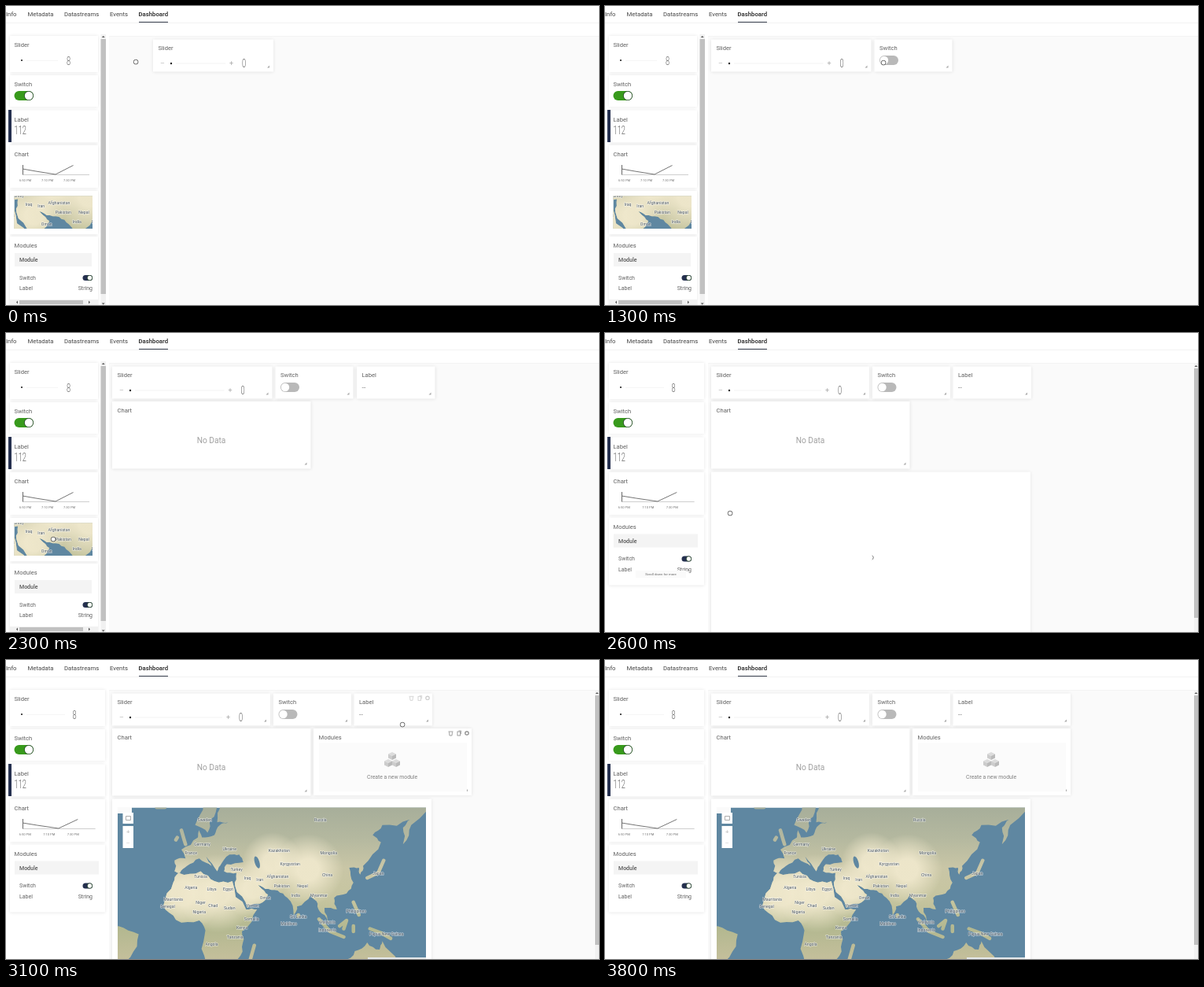
Recreate the animation shown at these times as an HTML page with a canvas. Size 754 by 380 pixels, loop 4.3 s.

```html
<!DOCTYPE html>
<html lang="en">
<head>
<meta charset="utf-8">
<title>Dashboard builder</title>
<style>
html, body { margin: 0; width: 100%; height: 100%; overflow: hidden; background: #fff; }
canvas { display: block; }
</style>
</head>
<body>
<canvas id="stage" width="754" height="380"></canvas>
<script>
const ctx = document.getElementById('stage').getContext('2d');
const LOOP = 4300, NAVY = '#25304f', GREEN = '#389a1c', OCEAN = '#5f87a1';
const clamp = v => Math.max(0, Math.min(1, v));
const mix = (a, b, k) => a + (b - a) * k;

// ---------- drawing helpers ----------
function text(s, x, y, size = 7.6, color = '#606060', weight = 400, align = 'left') {
  ctx.font = `${weight} ${size}px Roboto, sans-serif`;
  ctx.fillStyle = color;
  ctx.textAlign = align;
  ctx.fillText(s, x, y);
}
// Condensed light digits
function readout(s, x, y, align = 'center') {
  ctx.save();
  ctx.translate(x, y);
  ctx.scale(.6, 1);
  text(s, 0, 0, 15.5, '#666', 300, align);
  ctx.restore();
}
function rect(x, y, w, h, color) {
  ctx.fillStyle = color;
  ctx.fillRect(x, y, w, h);
}
function line(points, color, width = 1, closed = false) {
  ctx.beginPath();
  points.forEach(([x, y]) => ctx.lineTo(x, y));
  if (closed) ctx.closePath();
  ctx.strokeStyle = color;
  ctx.lineWidth = width;
  ctx.stroke();
}
function shape(points, color) {
  ctx.beginPath();
  points.forEach(([x, y]) => ctx.lineTo(x, y));
  ctx.fillStyle = color;
  ctx.fill();
}
function dot(x, y, r, color) {
  ctx.beginPath();
  ctx.arc(x, y, r, 0, 7);
  ctx.fillStyle = color;
  ctx.fill();
}
function arrow(x, y, angle) {
  ctx.save();
  ctx.translate(x, y);
  ctx.rotate(angle);
  shape([[-2, 1], [0, -1], [2, 1]], '#555');
  ctx.restore();
}
function card(x, y, w, h, fill = '#fff') {
  ctx.save();
  ctx.shadowColor = 'rgba(0,0,0,.1)';
  ctx.shadowBlur = 4;
  rect(x, y, w, h, fill);
  ctx.restore();
}
function pill(x, y, w, h, on, color) {
  ctx.beginPath();
  ctx.roundRect(x, y, w, h, h / 2);
  ctx.fillStyle = color;
  ctx.fill();
  const knob = on ? x + w - h / 2 : x + h / 2;
  if (on) dot(knob, y + h / 2, h / 2, '#2c4a30');
  dot(knob, y + h / 2, h / 2 - .8, '#fff');
}
function scrollbar(x, y, w, h, thumb) {
  rect(x, y, w, h, '#f1f1f1');
  rect(x, y + 6, w, thumb, '#c1c1c1');
  arrow(x + w / 2, y + 3, 0);
}

// ---------- world map: key coast points as longitude,latitude ----------
const CONTINENTS = [
  '-9,37 -9,43 -1,44 -4,48.5 8,54 9,57 11,54 20,55 24,59 30,60 22,60 24,66 17,61 15,56 6,59 12,66 26,71 42,67 68,69 105,77 180,70 163,59 157,51 157,58 162,61 142,59 135,55 141,52 128,40 126,35 125,39 118,39 121,30 116,23 107,20 109,12 100,13 104,2 98,9 95,16 90,22 80,14 77.5,8 73,20 66,25 57,26 50,30 56,25 59,22 53,16 44,13 35,28 36,36 27,37 29,41 41,42 38,46 31,46 24,40 22,37 14,45 18,40 9,44 0,40 -5,36',
  '-6,36 10,37 20,31 33,31 43,12 51,12 40,-4 40,-15 35,-26 14,-26 13,-6 9,4 -8,4.5 -17,15 -10,30',
  '114,-26 122,-18 131,-12 140,-17 142,-11 153,-26',
  '-50,0 -35,-6 -41,-22 -50,-27'
];
const ISLANDS = '-1,51 -2,53 -4,57|-8,53 -7,54|-22,65 -16,65|46,-24 49,-14|131,33 139,36 143,43|96,5 104,-4 114,-8|111,0 116,4 114,-2|121,0 121,-4|133,-2 141,-5 148,-9|121,17 125,8|81,8 81,7'.split('|');
const COUNTRIES = `Russia 97 61|Kazakhstan 67 48|Mongolia 103 47|Kyrgyzstan 75 41|China 102 35|Ukraine 31 49
France 3 47|Germany 11 51|Sweden 13 61|Turkey 36 38|Iraq 44 33|Iran 53 32|Afghanistan 66 34|Pakistan 69 28
Nepal 84 28|India 79 22|Oman 57 20|Yemen 48 15|Egypt 30 26|Libya 18 26|Algeria 3 27|Tunisia 10 34
Mauritania -10 19|Niger 10 17|Chad 19 15|Sudan 31 13|Senegal -14 14|Nigeria 9 10|Somalia 47 5|Kenya 40 -1
Angola 18 -13|Tanzania 35 -8|Sri Lanka 81 7|Maldives 74 2|Myanmar 96 22|Malaysia 102 3|Philippines 123 11
Indonesia 102 -3|Papua New Guinea 145 -6|Japan 139 36`.split(/[|\n]/)
  .map(s => s.match(/(.+) (\S+) (\S+)/).slice(1));

const project = (lon, lat) =>
  [230 + 1.75 * lon, 338 - 100 * Math.log(Math.tan(Math.PI / 4 + lat * Math.PI / 360))];
const parse = s => s.split(' ').map(p => project(...p.split(',').map(Number)));

let seed = 7;
const random = () => (seed = seed * 16807 % 2147483647) / 2147483647;

// Splits every edge and nudges its middle, for a natural coast.
function roughen(points) {
  return points.flatMap(([x, y], i) => {
    const [u, v] = points[(i + 1) % points.length], k = (random() - .5) * .3;
    return [[x, y], [(x + u) / 2 + (v - y) * k, (y + v) / 2 - (u - x) * k]];
  });
}
const land = new Path2D(), islands = new Path2D();
CONTINENTS.forEach(s => {
  roughen(roughen(parse(s))).forEach(([x, y], i) => i ? land.lineTo(x, y) : land.moveTo(x, y));
  land.closePath();
});
ISLANDS.forEach(s => parse(s).forEach(([x, y], i) => i ? islands.lineTo(x, y) : islands.moveTo(x, y)));

const terrain = ctx.createLinearGradient(0, 187, 0, 380);
['#a7ae9a', '#b4b89f', '#c9c6a6', '#c6c5a0', '#b3b890', '#c4bf9b']
  .forEach((color, i) => terrain.addColorStop(i / 5, color));

// Pale dry regions: Sahara, Arabia, Central Asia, Tibet
const deserts = [[-3, 23, 50], [22, 23, 50], [48, 26, 38], [62, 42, 38], [88, 38, 45]].map(([lon, lat, r]) => {
  const [x, y] = project(lon, lat), g = ctx.createRadialGradient(x, y, r * .3, x, y, r);
  g.addColorStop(0, 'rgba(243,235,208,.85)');
  g.addColorStop(1, 'rgba(243,235,208,0)');
  return g;
});

function map(x, y, w, h, dx, dy) {
  ctx.save();
  ctx.beginPath();
  ctx.rect(x, y, w, h);
  ctx.clip();
  rect(x, y, w, h, OCEAN);
  ctx.translate(dx, dy);
  ctx.lineJoin = ctx.lineCap = 'round';
  for (const fill of [terrain, ...deserts]) {
    ctx.fillStyle = fill;
    ctx.fill(land);
  }
  ctx.strokeStyle = terrain;
  ctx.lineWidth = 4.5;
  ctx.stroke(islands);
  ctx.fillStyle = OCEAN;
  ctx.beginPath();
  ctx.ellipse(...project(51, 42), 3, 8, -.3, 0, 7);
  ctx.fill();
  for (const [name, lon, lat] of COUNTRIES) {
    const [px, py] = project(+lon, +lat);
    ctx.font = '400 5.2px Roboto, sans-serif';
    ctx.textAlign = 'center';
    ctx.strokeStyle = 'rgba(255,255,255,.55)';
    ctx.lineWidth = 1.3;
    ctx.strokeText(name, px, py + 2);
    text(name, px, py + 2, 5.2, '#4c5864', 400, 'center');
  }
  ctx.restore();
}

// ---------- page ----------
function header() {
  rect(0, 0, 754, 380, '#fff');
  [['Info', 0], ['Metadata', 27.5], ['Datastreams', 74], ['Events', 132]]
    .forEach(([s, x]) => text(s, x, 13.2, 7.75, '#444'));
  text('Dashboard', 168.5, 13.2, 7.75, '#222', 500);
  rect(0, 21, 754, 1, '#f2f2f2');
  rect(169, 20, 37, 1, '#39404f');
  rect(131, 38, 623, 342, '#fafafa');
  rect(131, 38, 623, 1, '#f4f4f4');
}
function sidebar(t, narrow) {
  const right = narrow ? 126 : 117, edge = right - 8;
  const panel = (title, y, h) => {
    card(5, y, right - 5, h);
    text(title, 10.5, y + 14);
  };
  panel('Slider', 38, 46);
  rect(26, 69, edge - 69, 1, '#f5f5f5');
  dot(20, 69, 1.1, '#222');
  readout('8', narrow ? 87 : 79.5, 74.5);

  panel('Switch', 88, 40);
  pill(10.5, 108, 24.5, 12, true, GREEN);

  panel('Label', 132.5, 41);
  rect(3, 132, 4, 41, NAVY);
  readout('112', 10.5, 163, 'left');

  panel('Chart', 177, 54);
  const px = x => 21 + (x - 21) * (narrow ? 1.09 : 1);
  line([[21.5, 214.5], [px(106), 214.5]], '#bbb', .7);
  line([[21.5, 202], [21.5, 214.5]], '#555', .9);
  line([[21, 207], [px(38), 210], [px(63), 214], [px(85.5), 202.5]], '#666', .9);
  ['6:50 PM', '7:10 PM', '7:30 PM'].forEach((s, i) =>
    text(s, px(17 + 28 * i), 222.5, 4.1, '#777'));

  if (!narrow) {
    card(5, 235, 112, 55);
    map(10.5, 241.5, 99.5, 41.5, -278, -25);
  }
  const y = narrow ? 234.5 : 293;
  panel('Modules', y, narrow ? 86 : 90);
  rect(11, y + 21, edge - 11, 17, '#f4f4f4');
  text('Module', 17, y + 32, 7, '#555', 500);
  text('Switch', 17, y + 54.8, 7);
  text('Label', 17, y + 68.3, 7);
  text('String', 110, y + 68.3, 7, '#606060', 400, 'right');
  pill(97.5, y + 49, 12.5, 7, true, t >= 3200 && t < 3500 ? GREEN : NAVY);

  if (narrow) {
    if (t < 2700) {
      rect(39, 302, 64, 9, '#fafafa');
      text('Scroll down for more', 71, 308, 4.3, '#666', 400, 'center');
    }
    return;
  }
  rect(5, 373, 112, 7, '#f1f1f1');
  rect(17, 374, 81, 5, '#c1c1c1');
  arrow(14, 376.5, -Math.PI / 2);
  arrow(106, 376.5, Math.PI / 2);
  scrollbar(120.5, 36, 6.5, 344, 324);
  arrow(123.7, 378.5, Math.PI);
}

// ---------- widgets ----------
function widget(title, x, y, w, h, fill) {
  card(x, y, w, h, fill);
  text(title, x + 6.5, y + 13.8);
  const r = x + w - 5, b = y + h - 5;
  shape([[r, b - 3], [r, b], [r - 3, b]], '#aaa');
}
// Delete, copy and settings icons
function tools(right, y, color) {
  const x = right - 29;
  line([[x - .5, y - 2], [x + 5.5, y - 2]], color, .8);
  line([[x + .5, y - 1.5], [x + 1, y + 3], [x + 4, y + 3], [x + 4.5, y - 1.5]], color, .8);
  ctx.strokeRect(x + 11, y - 2, 3.6, 5);
  line([[x + 12.5, y - 3], [x + 15.7, y - 3], [x + 15.7, y + 1]], color, .7);
  ctx.beginPath();
  ctx.arc(x + 23, y, 2.2, 0, 7);
  ctx.lineWidth = 1.2;
  ctx.stroke();
}
function slider(x, w) {
  const right = x + w;
  widget('Slider', x, 42.5, w, 41);
  text('–', x + 12, 76, 9, '#bbb', 400, 'center');
  rect(x + 29, 72.5, w - 90, 1, '#f3f3f3');
  dot(x + 23, 73, 1.2, '#222');
  text('+', right - 53.5, 76, 9, '#aaa', 400, 'center');
  readout('0', right - 37.5, 78);
}
function cube(x, y, r) {
  const h = r / 2;
  shape([[x, y - r], [x + r, y - h], [x, y], [x - r, y - h]], '#dcdcdc');
  shape([[x - r, y - h], [x, y], [x, y + r], [x - r, y + h]], '#cccccc');
  shape([[x + r, y - h], [x, y], [x, y + r], [x + r, y + h]], '#bababa');
}
function modules(x, y, active) {
  widget('Modules', x, y, 201, 85);
  rect(x + 7, y + 18, 188, 62, '#fbfbfb');
  [[100, 35], [95, 44], [105, 44]].forEach(([dx, dy]) => cube(x + dx, y + dy, 5));
  text('Create a new module', x + 100, y + 64, 6.85, '#808080', 400, 'center');
  if (active) tools(x + 201, y + 6, '#888');
}
function worldMap(x, y, loaded) {
  widget('', x, y, 406, 220);
  if (!loaded) {
    ctx.beginPath();
    ctx.arc(338, 285.5, 3.2, -1, 1);
    ctx.strokeStyle = '#777';
    ctx.lineWidth = 1;
    ctx.stroke();
    return;
  }
  map(142, 187.5, 392, 193, 0, 0);
  rect(142, 187, 18, 8, '#fafafa');
  rect(148.5, 194, 13.5, 14, '#fff');
  line([[152.5, 198.5], [158.5, 198.5], [158.5, 203.5], [152.5, 203.5]], '#999', .8, true);
  rect(148.5, 211, 13.5, 28, '#fff');
  text('+', 155.2, 221, 8, '#bbb', 400, 'center');
  text('–', 155.2, 235, 8, '#ccc', 400, 'center');
  rect(460, 378, 74, 2, '#e6eaec');
}

// ---------- cursor: stops of time, x, y ----------
const STOPS = `400 165 71|700 386 77|800 348 73|1100 24 114|1300 354 72|1400 20 152|1600 462 66|1900 52 203
2100 152 110|2300 60 262|2600 159 229|2700 60 262|3000 430 100|3100 504 82|3400 582 82|3800 660 170`
  .split(/[|\n]/).map(s => s.split(' ').map(Number));

function cursorAt(t) {
  const next = Math.max(1, STOPS.findIndex(([at]) => at >= t));
  const [a, x, y] = STOPS[next - 1], [b, u, v] = STOPS[next];
  const k = clamp((t - a) / (b - a));
  return [mix(x, u, k), mix(y, v, k)];
}
function cursor(t) {
  if (t >= 3800) return;
  const [x, y] = cursorAt(t), resizing = t === 600 || t === 700 || t >= 3200;
  if (resizing) {
    shape([[x, y], [x, y + 8], [x + 2, y + 6.2], [x + 3.4, y + 9.2], [x + 4.6, y + 8.6],
      [x + 3.3, y + 5.8], [x + 5.6, y + 5.6]], '#1f4a1c');
    return;
  }
  ctx.beginPath();
  ctx.roundRect(x - 2.6, y - 2.6, 5.4, 5.4, 2);
  ctx.fillStyle = '#fff';
  ctx.fill();
  ctx.strokeStyle = '#555';
  ctx.lineWidth = .9;
  ctx.stroke();
}

// A dragged widget follows the cursor until dropped.
function place(t, grab, drop, x, y, draw) {
  if (t < grab) return;
  const [cx, cy] = cursorAt(t);
  t < drop ? draw(cx - 12, cy - 20) : draw(x, y);
}

function scene(t) {
  const narrow = t >= 2500, resizing = t >= 3200 && t < 3600;
  header();
  sidebar(t, narrow);

  slider(mix(187, 135, clamp((t - 800) / 200)), t < 700 ? 153 : narrow ? 201 : 203.5);

  place(t, 1200, 1300, narrow ? 340 : 342.5, 42.5, (x, y) => {
    widget('Switch', x, y, 99, 41);
    pill(x + 6.5, y + 20.5, 24, 12, false, '#b9b9b9');
  });
  place(t, 1500, 1600, narrow ? 442.5 : 446, 42.5, (x, y) => {
    const w = mix(99.5, 149.5, clamp((t - 3200) / 200));
    widget('Label', x, y, w, 41, resizing ? '#f1f1f3' : '#fff');
    text('--', x + 6.5, y + 29.5, 8.6, '#888');
    if (t >= 3100 && t < 3600) tools(x + w - (resizing ? 6 : 0), 48.3, resizing ? '#888' : '#ccc');
  });
  place(t, 2000, 2100, 135, 87, (x, y) => {
    widget('Chart', x, y, 252.5, 85.5);
    text('No Data', x + 126, y + 52.5, 10.2, '#a0a0a0', 400, 'center');
  });
  place(t, 2400, 2500, 135, 176.5, (x, y) => worldMap(x, y, t >= 2800));
  place(t, 2800, 3000, 391, 87, (x, y) => modules(x, y, t >= 3000 && t < 3200));
  if (narrow) scrollbar(749, 39, 5, 341, 317);
  cursor(t);
}

function frame(now) {
  const t = now % LOOP;
  scene(t < 500 ? 0 : Math.min(3800, Math.floor(t / 100) * 100));
  requestAnimationFrame(frame);
}
requestAnimationFrame(frame);
</script>
</body>
</html>
```
